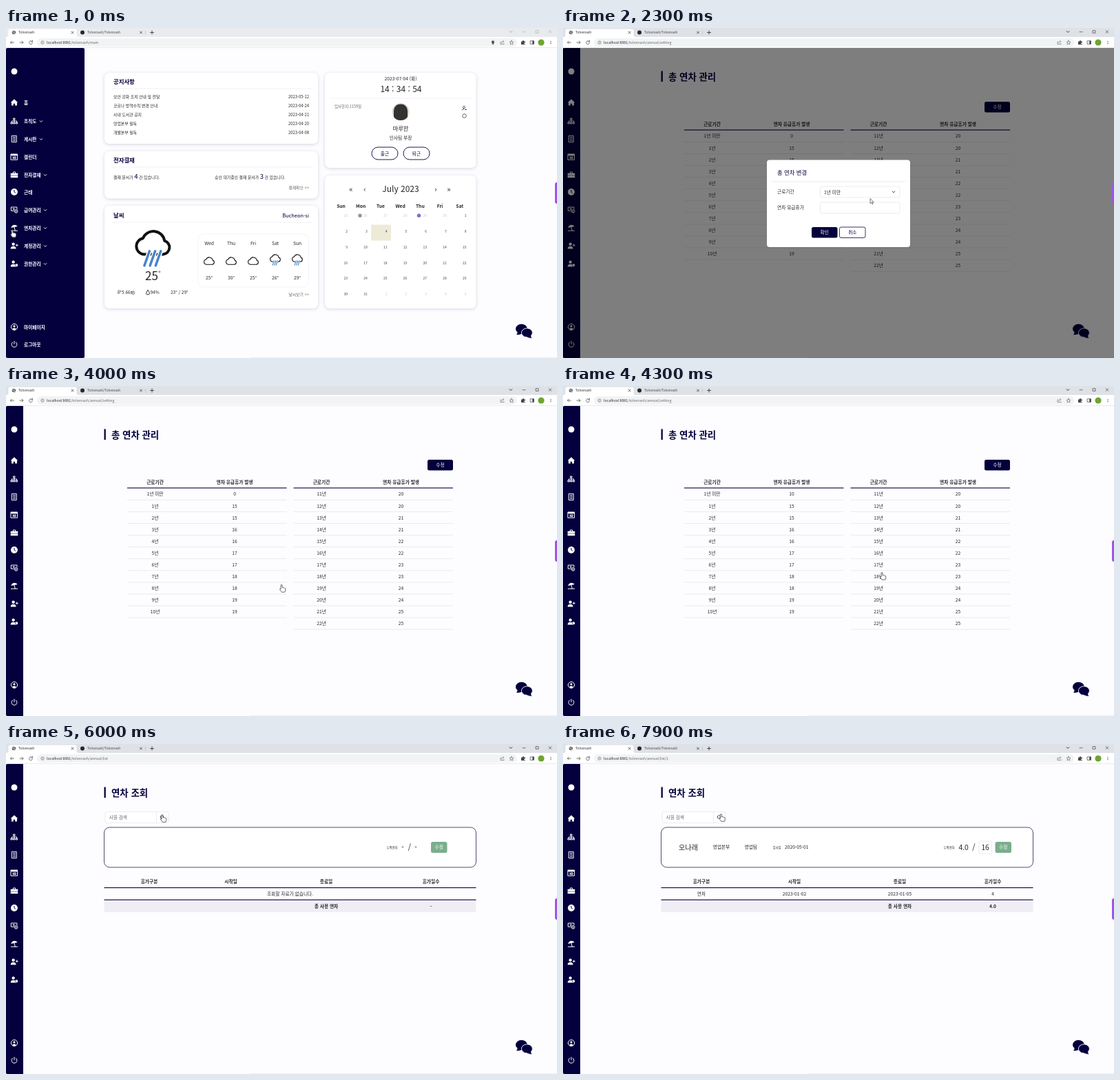
An HTML page for the animation above (8 s loop, 800x479 px).

```html
<!DOCTYPE html>
<html lang="ko">
<head>
<meta charset="utf-8">
<title>Tolvenash</title>
<style>
html, body { margin: 0; width: 100%; height: 100%; overflow: hidden; background: #fdfcff; }
.layer { position: absolute; left: 0; top: 0; width: 800px; height: 479px; overflow: hidden; }
svg { display: block; font-family: "Noto Sans CJK KR", "Noto Sans CJK", "Noto Sans", sans-serif; }
.ui { font-family: "Open Sans", "Noto Sans", sans-serif; }
.card { fill: #fff; filter: drop-shadow(0 1px 2.5px rgba(60, 50, 90, .2)); }
</style>
</head>
<body>
<script>
const NAVY = '#03003d', INK = '#25252b', LINE = '#dfdfe5', LOOP = 8000;

// Drawing helpers; text is placed by its vertical centre
const attrs = o => Object.entries(o).map(([k, v]) => ` ${k}="${v}"`).join('');
const text = (x, y, s, size = 6.7, o = {}) =>
  `<text x="${x}" y="${y + size * .37}" font-size="${size}"${attrs({ fill: INK, ...o })}>${s}</text>`;
const mid = (x, y, s, size, o) => text(x, y, s, size, { 'text-anchor': 'middle', ...o });
const end = (x, y, s, size, o) => text(x, y, s, size, { 'text-anchor': 'end', ...o });
const bold = { 'font-weight': 700 }, light = { 'font-weight': 300 };
const rect = (x, y, x2, y2, fill, r = 0, o = {}) =>
  `<rect x="${x}" y="${y}" width="${x2 - x}" height="${y2 - y}" rx="${r}" fill="${fill}"${attrs(o)}/>`;
const box = (x, y, x2, y2, stroke = LINE, r = 2.5, w = .6, fill = '#fff') =>
  rect(x, y, x2, y2, fill, r, { stroke, 'stroke-width': w });
const hline = (x, x2, y, color = LINE, w = .6) => rect(x, y - w / 2, x2, y + w / 2, color);
const stroke = (d, color = INK, w = .8, o = {}) =>
  `<path d="${d}" fill="none" stroke="${color}" stroke-width="${w}" stroke-linecap="round" stroke-linejoin="round"${attrs(o)}/>`;
const fill = (d, color = INK) => `<path d="${d}" fill="${color}"/>`;
const dot = (x, y, r, color, o = {}) => `<circle cx="${x}" cy="${y}" r="${r}" fill="${color}"${attrs(o)}/>`;
const group = (cls, s, move = '') => `<g class="${cls}"${move && ` transform="${move}"`}>${s}</g>`;
const button = (x, y, x2, y2, label, color = NAVY) =>
  rect(x, y, x2, y2, color, 2.5) + mid((x + x2) / 2, (y + y2) / 2, label, 6.7, { fill: '#fff', 'font-weight': 500 });
const lens = (x, y) => stroke(`M${x - 2.8} ${y - .6}a2.2 2.2 0 1 0 4.4 0a2.2 2.2 0 1 0-4.4 0M${x + .9} ${y + .9}l2 2`, '#333', .8);
const down = (x, y, c = INK) => stroke(`M${x - 1.8} ${y - .9}l1.8 1.8l1.8-1.8`, c, .9);
const cross = (x, y, r, c = INK, w = .7) => stroke(`M${x - r} ${y - r}l${2 * r} ${2 * r}m0 ${-2 * r}l${-2 * r} ${2 * r}`, c, w);
const layer = (cls, s) => `<div class="layer ${cls}"><svg width="800" height="479">${s}</svg></div>`;
const heading = s => rect(142.5, 62.5, 144.8, 78, NAVY) + text(153, 71, s, 13.4, { fill: NAVY, 'font-weight': 700 });

// Keyframe tracks: [ms, value] pairs on one shared loop
const sheet = document.head.appendChild(document.createElement('style'));
function track(cls, prop, keys, ease = 'step-end') {
  const stops = [...keys, [LOOP, keys.at(-1)[1]]].map(([t, v]) => `${t / LOOP * 100}%{${prop}:${v}}`).join('');
  sheet.textContent += `@keyframes ${cls}{${stops}} .${cls}{animation:${cls} ${LOOP}ms ${ease} infinite}\n`;
}
function during(cls, ...spans) {
  const keys = spans[0][0] ? [[0, 0]] : [];
  for (const [a, b] of spans) {
    keys.push([a, 1]);
    if (b < LOOP) keys.push([b, 0]);
  }
  track(cls, 'opacity', keys);
}

function browser() {
  const tabs = rect(0, 0, 800, 13, '#dee1e6') + group('unfocused', rect(0, 0, 800, 13, '#e9ebee')) +
    fill('M1 13Q3.5 13 3.5 10V4Q3.5 1.5 6 1.5H100Q102.500 1.5 102.500 4V10Q102.500 13 105 13Z', '#fff') +
    dot(11.500, 6.5, 2.8, '#5f6368') + stroke('M9.500 5.5l2 1l1-2M11 9l1-1.500l1.800.2', '#fff', .6) +
    text(18, 6.5, 'Tolvenash', 4.9) + cross(96.5, 6.5, 1.5) +
    dot(111, 6.5, 3, '#24292f') + text(118, 6.5, 'Tolvenash/Tolvenash', 4.9, { fill: '#444' }) + cross(196, 6.5, 1.5) +
    rect(202.500, 4, 203, 9.500, '#a5a8ad') + stroke('M209.500 6.5h5m-2.5-2.5v5') +
    down(733, 5.5) + stroke('M750 5.700h4M769.500 3.700h3.500v3.600h-3.500z', INK, .6) + cross(790, 5.5, 1.8, INK, .6) +
    group('unfocused', rect(728, 1, 798, 11, '#e9ebee', 0, { opacity: .65 }));
  const path = (cls, s) => group(cls, text(59, 21, `localhost:8081<tspan fill="#666">/tolvenash/${s}</tspan>`, 5.2));
  return tabs + rect(0, 13, 800, 28.500, '#fff') + rect(45, 15, 742, 27, '#f1f3f4', 6) + hline(0, 800, 28.500, '#dcdde0', .6) +
    stroke('M11.500 21h-5m2-2l-2 2l2 2M20 21h5m-2-2l2 2l-2 2', '#555') + stroke('M38 19.500a2.500 2.500 0 1 0 .5 2.200M38.500 18v2h-2', '#555') +
    dot(53, 21, 2.200, 'none', { stroke: '#666', 'stroke-width': .6 }) + stroke('M53 20.800v1.200M53 19.700v.1', '#666', .6) +
    path('urlMain', 'main') + path('urlSet', 'annual/setting') + path('urlList', 'annual/list') + path('urlOne', 'annual/list/1') +
    group('urlMain', fill('M707 24.500Q704.500 21 705 19.700A2.100 2.100 0 0 1 709 19.700Q709.500 21 707 24.500', '#555')) +
    stroke('M719 20h-1v3.500h5v-1M719.500 22q.5-2.500 3-2.500m-1-1.300l1.300 1.300l-1.300 1.300', '#666', .6) +
    stroke('M734 18.200l.9 1.900l2.100.2l-1.600 1.400l.5 2.100l-1.900-1.100l-1.900 1.100l.5-2.100l-1.600-1.400l2.100-.2z', '#555', .6) +
    fill('M748 19.500h2a1.100 1.100 0 1 1 2 0h2v2a1.100 1.100 0 1 0 0 1.500v1h-6z', '#444') +
    stroke('M761.500 18.700h5v4.600h-5z', '#444', .7) + rect(764.3, 18.700, 766.500, 23.300, '#444') +
    dot(777, 21, 4.600, '#6fa52f') + [19.300, 21, 22.700].map(y => dot(791, y, .6, '#444')).join('');
}

const CLOUD = 'M6.5 19a5 5 0 0 1-.6-9.900A7 7 0 0 1 19.300 10.600A4.300 4.300 0 0 1 18.500 19Z';
const cloud = (x, y, k, rain, w) => group('', stroke(CLOUD, '#111', w) +
  (rain ? stroke('M10 17L6.800 26M13.500 17L10.300 26M17 17L13.800 26', '#fff', 2.800) + stroke('M10 17L6.800 26M13.500 17L10.300 26M17 17L13.800 26', '#4785cc', 1.500) : ''),
  `translate(${x} ${y}) scale(${k})`);

function home() {
  const card = (x, y, x2, y2) => rect(x, y, x2, y2, '#fff', 7, { class: 'card' });
  const title = (y, s) => text(156, y, s, 8.4, { fill: NAVY, 'font-weight': 700 }) + hline(153, 446, y + 10, '#e6e4ec');
  const gray = { fill: '#666' };
  const num = n => `<tspan font-size="9.500" fill="${NAVY}">${n}</tspan>`;
  const notices = [['보안 강화 조치 안내 및 전달', '05-12'], ['코로나 방역수칙 변경 안내', '04-24'], ['사내 도서관 공지', '04-21'],
    ['영업본부 필독', '04-20'], ['개발본부 필독', '04-08']];
  const forecast = [['Wed', 25], ['Thu', 30], ['Fri', 25], ['Sat', 26], ['Sun', 29]];
  let s = card(143, 65, 453, 168) + title(78, '공지사항') +
    notices.map(([t, d], i) => text(156, 99.500 + 13 * i, t, 5.850) + end(440, 99.500 + 13 * i, '2023-' + d, 5.850)).join('');
  s += card(143, 179, 453, 247.500) + title(192, '전자결재') + text(156, 216.500, `결재 문서가 ${num(4)} 건 있습니다.`, 5.850) +
    text(303, 216.500, `승인 대기중인 결재 문서가 ${num(3)} 건 있습니다.`, 5.850) + end(440, 232, '결재확인 &gt;&gt;', 5.850, gray);
  s += card(143, 258, 453, 407) + title(272, '날씨') + end(440, 272.500, 'Bucheon-si', 7.400, { fill: NAVY }) +
    cloud(185, 284, 2.340, true, 1.700) + text(202, 360, '25<tspan font-size="10" dy="-6">°</tspan>', 17, light) +
    stroke('M162 383h4q1.500-.8.3-2M162 385h3M163 381h1.500', INK, .7) + text(168, 384, '5.66㎧', 6.5) +
    stroke('M206 380.500q-4 5-1.500 6.300h3q2.500-1.300-1.500-6.300', INK, 1) + text(209.500, 384, '94%', 6.5) + text(239, 384, '23° / 29°', 6.5) +
    box(278.500, 299, 439.500, 376, '#eceaf1', 8) +
    forecast.map(([d, n], i) => {
      const x = 295 + 32 * i, wet = i > 2;
      return mid(x, 313, d, 6.700) + cloud(x - 8.800, wet ? 325.500 : 329.500, .72, wet, 1.500) + mid(x, 363, n + '°', 6.700);
    }).join('') + end(440, 387, '날씨보기 &gt;&gt;', 5.850, gray);
  s += card(463, 65, 682.500, 203) + mid(573, 74, '2023-07-04 (화)', 6.700) + mid(573.500, 89, '14 : 34 : 54', 12, light) +
    hline(470, 675, 102, '#e6e4ec') + text(477, 114, '입사한지 1159일', 5.500, gray) +
    dot(573, 121.500, 12.500, '#d9d8d6') + fill('M563 129V120Q564 110.500 573 110.500T583 120V129Q580 134 573 134T563 129Z', '#35322f') +
    dot(665, 115, 1.600, 'none', { stroke: INK, 'stroke-width': .7 }) + stroke('M662.500 119q.5-2 2.500-2M666.500 118.500h2', INK, .9) +
    dot(665.500, 127.500, 2.800, 'none', { stroke: INK, 'stroke-width': .7 }) +
    mid(573, 146, '마루한', 8.400) + mid(573, 159.500, '인사팀 부장', 6.700) +
    [['출근', 531], ['퇴근', 577]].map(([t, x]) => box(x, 173, x + 38, 191, NAVY, 9, .9) + mid(x + 19, 182.200, t, 6.700, { fill: NAVY })).join('');
  s += card(463, 214, 682.500, 407) + mid(573, 233.500, 'July 2023', 12, light) +
    [['«', 501], ['‹', 521], ['›', 624], ['»', 643]].map(([c, x]) => mid(x, 233.500, c, 11)).join('') +
    'Sun,Mon,Tue,Wed,Thu,Fri,Sat'.split(',').map((d, i) => mid(486.500 + 28.700 * i, 258.500, d, 6.700, bold)).join('') +
    rect(530, 285.500, 559, 308.500, '#efedda') + rect(530, 285.500, 559, 308.500, 'url(#hatch)');
  for (let i = 0; i < 42; i++) {
    const d = i < 6 ? 25 + i : i < 37 ? i - 5 : i - 36, out = i < 6 || i > 36;
    s += end(496 + 28.750 * (i % 7), 272 + 22.900 * Math.floor(i / 7), d, 5, { fill: out ? '#c8c8cc' : '#444' });
  }
  return s + dot(514, 272.300, 2.700, '#99919f') + dot(599.500, 272.300, 2.700, '#7772cf');
}

function settings() {
  const table = (x, from, n) => {
    const a = x + 40.500, b = x + 156;
    let s = mid(a, 139.500, '근로기간', 6.700, bold) + mid(b, 139.500, '연차 유급휴가 발생', 6.700, bold) + hline(x, x + 231.500, 148, NAVY, 1.100);
    for (let i = 0; i < n; i++) {
      const y = 157 + 17.060 * i, year = from + i;
      s += mid(a, y, year ? year + '년' : '1년 미만') + hline(x, x + 231.500, y + 8.500);
      s += year ? mid(b, y, 15 + Math.floor((year - 1) / 2)) : group('before', mid(b, y, 0)) + group('after', mid(b, y, 10));
    }
    return s;
  };
  return heading('총 연차 관리') + button(612, 107, 649, 122.500, '수정') +
    group('editHover', button(612, 107, 649, 122.500, '수정', '#3b376d')) + table(176, 0, 11) + table(417.500, 11, 12);
}

function list(row, cols, foot, info) {
  const put = (y, cells, o) => cells.map((c, i) => mid(cols[i], y, c, 6.700, o)).join('');
  return heading('연차 조회') + box(144, 98.500, 236, 114.500) + rect(218.300, 98.500, 218.900, 114.500, LINE) +
    text(149.500, 106.500, '사원 검색', 6.700, { fill: '#666' }) + lens(227, 106.500) +
    box(142.500, 121, 682.500, 179, NAVY, 8, .7) + text(552.500, 150, '누적연차', 4.350) + info +
    put(200, ['휴가구분', '시작일', '종료일', '휴가일수'], bold) + hline(142.500, 682.500, 208.600, NAVY, 1.100) + row(put) +
    rect(142.500, 226, 682.500, 244, '#f0edf5') + hline(142.500, 682.500, 226.200, NAVY, 1.100) + put(235.300, ['', '', '총 사용 연차', foot], bold);
}
const GREEN = '#7bae8e';
const emptyList = () => list(() => mid(412.500, 217.700, '조회할 자료가 없습니다.'), [208, 326.500, 465, 617], '-',
  mid(576, 150, '-', 11) + mid(586, 150, '/', 11) + mid(595, 150, '-', 11) + button(617, 142, 640.500, 158, '수정', GREEN));
const personList = () => list(put => put(217.700, ['연차', '2023-01-02', '2023-01-05', '4']), [201, 336, 489, 624], '4.0',
  text(168, 150, '오나래', 10.100) + text(217.500, 150, '영업본부') + text(263.500, 150, '영업팀') + text(304.500, 150, '입사일', 4.350) +
  text(322, 150, '2020-05-01') + text(574.500, 150, '4.0', 10.300) + mid(596.500, 150, '/', 11) +
  box(604, 141, 622.500, 159.500) + mid(613, 150.500, '16', 10) + button(627.500, 142, 651, 158, '수정', GREEN));

const panel = (y, y2) => rect(296, y, 504, y2, '#fff', 4);

function editModal() {
  return panel(191.500, 318) + text(311, 210, '총 연차 변경', 8.400, { fill: NAVY, 'font-weight': 500 }) + hline(303, 497, 223) +
    text(311, 238, '근로기간') + box(373.500, 230, 489, 246) + text(379, 238.200, '1년 미만') + down(480, 238) +
    text(311, 261, '연차 유급휴가') + box(373.500, 253, 489, 269) + group('focus', box(373.500, 253, 489, 269, NAVY, 2.500, 1)) +
    group('one', text(379, 261, '1')) + group('ten', text(379, 261, '10')) +
    button(361, 289, 398.500, 304.500, '확인') + group('okHover', button(361, 289, 398.500, 304.500, '확인', '#3b376d')) +
    box(401.500, 289, 439, 304.500, NAVY, 2.500, .8) + mid(420.300, 296.700, '취소', 6.700, { fill: NAVY });
}

function userModal() {
  const staff = ['오나래 사장', '유너울 이사', '민보람 이사', '서가온 부장', '도다솔 차장', '표해찬 과장', '노을찬 대리', '구슬비 주임', '반소울 주임', '채들샘 사원'];
  const check = (y, c = '#c3c3cb') => box(399.500, y - 3, 405.500, y + 3, c, 1.500, .6);
  const rows = staff.map((n, i) => {
    const y = 203 + 17.100 * i;
    return mid(452.500, y, n) + hline(393, 493, y + 8.500);
  }).join('');
  return panel(121.500, 387.500) + text(303, 134.500, '사용자 검색', 8.400) + cross(493.700, 134.500, 2.700, '#444') + hline(296, 504, 148) +
    box(304.500, 154.500, 396, 170.500) + rect(378.700, 154.500, 379.300, 170.500, LINE) + text(310, 162.500, '이름 입력', 6.700, { fill: '#666' }) +
    lens(387.500, 162.500) + mid(348, 185.500, '팀명', 6.700, bold) + check(185, '#dcdce2') + mid(453, 185.500, '성명', 6.700, bold) +
    hline(303, 493, 194, NAVY, 1.100) + mid(348, 288.500, '영업팀', 6.700, bold) + rect(392.700, 194.500, 393.200, 358, '#eeeef2') +
    group('', group('rowHover', group('rowMove', rect(393, 194.700, 412, 211.500, '#e9e9ec'))) + rows +
      staff.map((n, i) => check(203 + 17.100 * i)).join('')).replace('<g', '<g clip-path="url(#rows)"') +
    group('checked', box(399.500, 200, 405.500, 206, NAVY, 1.500, .6, NAVY) + stroke('M401 203l1.200 1.200l2.200-2.400', '#fff', .8)) +
    rect(499.500, 148.300, 504, 358, '#eeeef3') + rect(499.500, 148.300, 504, 193.500, '#2a2760', 2) +
    button(388.500, 365, 411.500, 381, '확인');
}

function sidebar() {
  const disc = (x, y, r) => `M${x - r} ${y}a${r} ${r} 0 1 0 ${2 * r} 0a${r} ${r} 0 1 0 ${-2 * r} 0`;
  const user = disc(6, 4.500, 3.300) + 'M0 15Q0 9 6 9T12 15Z';
  // [label, y, filled path, stroked path, has submenu]
  const items = [
    ['홈', 108, 'M0 8.500L8 1l8 7.500h-2V15H9.800v-4.500H6.200V15H2V8.500Z', ''],
    ['조직도', 135, '', 'M6.500 2h3v3h-3zM1 11h3v3H1zM6.500 11h3v3h-3zM12 11h3v3h-3zM8 5v6M2.500 11V8h11v3', 1],
    ['게시판', 161, '', 'M3 1h10v14H3zM5.500 4.500h5M5.500 8h5M5.500 11.500h5', 1],
    ['캘린더', 187, 'M1 2h14v3.500H1z', 'M1 2h14v12.500H1zM5.500 8v4M8.500 8h2.500v4H8.500z'],
    ['전자결재', 213, 'M0 4.500h16V9H0zM0 10h16v4.500H0z', 'M5.500 4.500V2h5v2.500', 1],
    ['근태', 238, disc(8, 8, 7.500), ''],
    ['급여관리', 264, '', 'M7 10H1V2h13v4' + disc(12, 11, 3.500) + disc(7, 6, 1.500) + 'M12 9.500v3', 1],
    ['연차관리', 290, 'M1 8C2 1 11-1 15 5Z', 'M8 6.500l2 8M1 14.500h14', 1],
    ['계정관리', 316, user, 'M11.500 7h4.500M13.800 4.700v4.600', 1],
    ['권한관리', 342, user + disc(13, 11.500, 3), '', 1],
    ['마이페이지', 434, disc(8, 6, 2.300) + 'M3.500 12.500Q8 7 12.500 12.500Q8 16 3.500 12.500', disc(8, 8, 7)],
    ['로그아웃', 459, '', 'M4.500 3.500a6 6 0 1 0 7 0M8 1.500v6'],
  ];
  const item = ([label, y, f, l, sub]) =>
    group('', fill(f, '#fff') + stroke(l, '#fff', 1.500) + (label === '근태' ? stroke('M8 4v4l2.500 2', NAVY, 1.500) : ''), `translate(6.700 ${y - 5.300}) scale(.66)`) +
    text(26, y + .3, label, 6.700, { fill: '#fff', 'font-weight': 700 }) + (sub ? down(label.length > 3 ? 57 : 51, y + .5, '#fff') : '');
  const shifted = y => y > 300 && y < 400;
  return rect(0, 29, 114, 479, NAVY, 2) + dot(12, 63, 4.500, '#fff') +
    items.filter(i => !shifted(i[1])).map(item).join('') +
    group('submenu', text(32, 307, '연차 조회', 6.300, { fill: '#fff' }) + text(32, 323, '총 연차 관리', 6.300, { fill: '#fff' })) +
    group('below', items.filter(i => shifted(i[1])).map(item).join(''));
}

const chat = () => fill('M741 445Q743 443 742.500 441.500A8.500 6.800 0 1 1 750 443.300Q745 446 741 445Z', NAVY) +
  `<path d="M764 450.300Q762.500 448.500 762.500 446.500A8 6.500 0 1 0 756 448.800Q760 451 764 450.300Z" fill="${NAVY}" stroke="#fdfcff" stroke-width=".9"/>`;

const HAND = 'M-1 0Q0-1 1 0V3.700Q2 3 2.800 4Q3.800 3.500 4.400 4.500Q5.600 4.200 5.600 5.500V7.500Q5.500 9 4.500 10.500H0Q-1-9-1 10.500Z';
const hand = () => `<path d="M-1 .2Q0-1.300 1 .2V3.600Q2.200 3 2.800 4Q4 3.500 4.500 4.500Q5.700 4.300 5.700 5.700V7.500Q5.600 9 4.700 10.300H.2Q-1.500 8-2.600 6.300Q-2.700 4.800-1 6Z" fill="#fff" stroke="#222" stroke-width=".7" stroke-linejoin="round"/>`;
const arrow = () => `<path d="M0 0V7.200L1.700 5.700L2.900 8.300L4 7.800L2.900 5.300H5.100Z" fill="#fff" stroke="#222" stroke-width=".6" stroke-linejoin="round"/>`;

const defs = `<defs><pattern id="hatch" width="3" height="3" patternUnits="userSpaceOnUse">${stroke('M0 3L3 0', '#e2dfc6', .5)}</pattern>
  <clipPath id="rows">${rect(296, 194.600, 504, 358, '#000')}</clipPath></defs>`;

document.body.innerHTML =
  layer('', defs + rect(0, 0, 800, 479, '#fdfcff') + group('home', home()) + group('setting', settings()) +
    group('empty', emptyList()) + group('person', personList()) + hline(355, 800, 478.300, '#ececf0', .8) + chat()) +
  layer('side', sidebar()) +
  layer('', group('dim', rect(0, 29, 800, 479, '#000', 0, { opacity: .5 })) +
    group('edit', group('editDrop', editModal())) + group('users', group('usersDrop', userModal())) +
    rect(797, 224, 806, 255, '#9c55e6', 3) + browser() + group('pointer', group('hand', hand()) + group('arrow', arrow())));

// Pages and addresses
during('unfocused', [0, 300]);
during('home', [0, 1000]);
during('setting', [1000, 5100]);
during('empty', [5100, 7500]);
during('person', [7500, LOOP]);
during('urlMain', [0, 1000]);
during('urlSet', [1000, 5100]);
during('urlList', [5100, 7500]);
during('urlOne', [7500, LOOP]);
during('before', [0, 4050]);
during('after', [4050, LOOP]);

// Side menu
track('side', 'width', [[0, '114px'], [1080, '114px'], [1280, '25px'], [4600, '25px'], [4750, '114px'], [5140, '114px'], [5300, '25px']], 'ease-in-out');
track('submenu', 'opacity', [[0, 0], [350, 0], [500, 1], [999, 1], [1000, 0], [4820, 0], [4930, 1], [5099, 1], [5100, 0]], 'linear');
const shut = 'translateY(0)', open = 'translateY(34px)';
track('below', 'transform', [[0, shut], [350, shut], [500, open], [999, open], [1000, shut], [4820, shut], [4930, open], [5099, open], [5100, shut]], 'ease-out');

// Dialogs
const fade = (a, b) => [[a, 0], [a + 150, 1], [b, 1], [b + 150, 0]];
const drop = (a, b) => [[0, 'translateY(-20px)'], [a, 'translateY(-20px)'], [a + 220, shut], [b, shut], [b + 220, 'translateY(-20px)']];
track('dim', 'opacity', [[0, 0], ...fade(1900, 3850), ...fade(6050, 7300)], 'linear');
track('edit', 'opacity', [[0, 0], ...fade(1900, 3850)], 'linear');
track('users', 'opacity', [[0, 0], ...fade(6050, 7300)], 'linear');
track('editDrop', 'transform', drop(1900, 3850), 'ease-out');
track('usersDrop', 'transform', drop(6050, 7300), 'ease-out');
during('editHover', [1450, 1950]);
during('focus', [2500, 4100]);
during('one', [2900, 3050]);
during('ten', [3050, 4100]);
during('okHover', [3500, 4000]);
during('rowHover', [6320, 6950]);
track('rowMove', 'transform', [[0, 3], [6520, 2], [6590, 1], [6660, 0]].map(([t, n]) => [t, `translateY(${17.1 * n}px)`]));
during('checked', [6800, 7500]);

// Pointer
during('arrow', [1080, 1450], [1950, 3500], [5180, 5720], [6150, 6300]);
during('hand', [0, 1080], [1450, 1950], [3500, 5180], [5720, 6150], [6300, LOOP]);
track('pointer', 'transform', [
  [0, 9, 293.5], [250, 36, 288], [450, 36, 288], [750, 46, 320], [1000, 46, 320], [1500, 630.5, 114.5], [1900, 630.5, 114.5],
  [2400, 430, 259], [3100, 430, 259], [3600, 390.5, 291.5], [3900, 390.5, 291.5], [4300, 463, 271], [4650, 14, 288],
  [4820, 38, 288], [4980, 44, 304], [5100, 44, 304], [5400, 319.5, 231], [5800, 227, 103], [6080, 227, 103],
  [6400, 406, 257.5], [6470, 406, 257.5], [6720, 402.5, 201], [6850, 402.5, 201], [7150, 400, 370], [7350, 400, 370], [7800, 229.5, 102],
].map(([t, x, y]) => [t, `translate(${x}px,${y}px)`]), 'ease-in-out');
</script>
</body>
</html>
```
